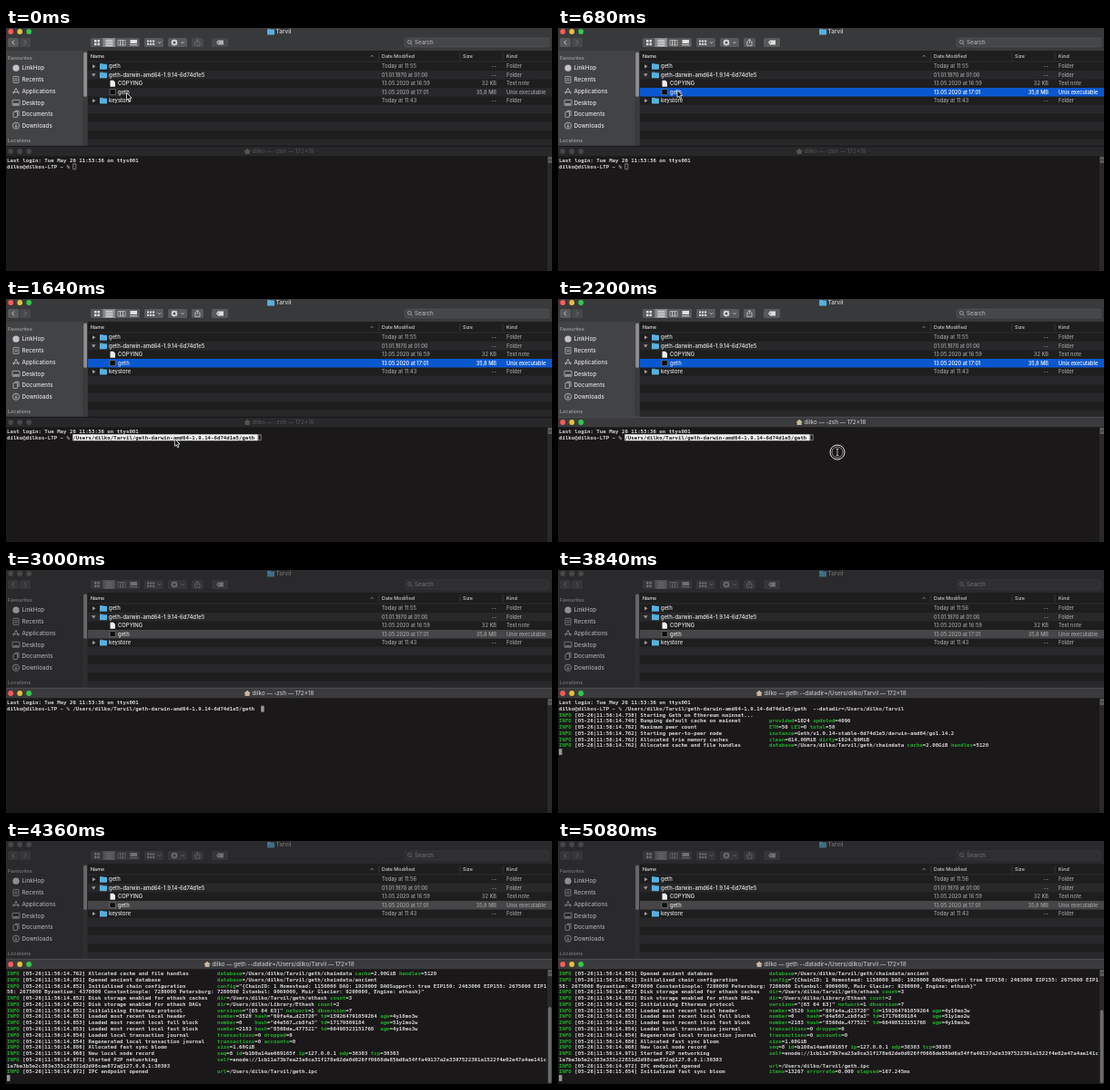
An HTML page with a canvas for the animation above (5.12 s loop, 600 by 268 pixels).

```html
<!DOCTYPE html>
<html lang="en">
<head>
<meta charset="utf-8">
<title>Drag a binary into the terminal</title>
<style>
html, body { margin: 0; width: 100%; height: 100%; overflow: hidden; background: #1b181a; }
canvas { display: block; width: 600px; height: 268px; }
</style>
</head>
<body>
<canvas id="stage" width="600" height="268"></canvas>
<script>
const c = document.getElementById('stage').getContext('2d');
const LOOP = 5120, STEP = 40;
const SANS = 'Inter, sans-serif', MONO = '"DejaVu Sans Mono", monospace';
const GREEN = '#22ad2a', WHITE = '#d8d8d8';

// Timeline, ms
const SELECT = 480, DRAG = 880, DROP = 1480, INSERT = 1640, FOCUS = 2200, BLUR = 2240;
const TYPE = 2880, ENTER = 3640, MODIFIED = 3760;

// ---------- drawing helpers ----------
function box(x, y, w, h, fill, r = 0) {
  c.fillStyle = fill;
  c.beginPath();
  c.roundRect(x, y, w, h, r);
  c.fill();
}
function frame(x, y, w, h, color, r = 0, lw = .7) {
  c.strokeStyle = color;
  c.lineWidth = lw;
  c.beginPath();
  c.roundRect(x, y, w, h, r);
  c.stroke();
}
function dot(x, y, r, fill) {
  c.fillStyle = fill;
  c.beginPath();
  c.arc(x, y, r, 0, 7);
  c.fill();
}
function ring(x, y, r, color, lw) {
  c.strokeStyle = color;
  c.lineWidth = lw;
  c.beginPath();
  c.arc(x, y, r, 0, 7);
  c.stroke();
}
function line(points, color, lw = .8) {
  c.strokeStyle = color;
  c.lineWidth = lw;
  c.beginPath();
  points.forEach(([x, y]) => c.lineTo(x, y));
  c.stroke();
}
function poly(points, fill) {
  c.fillStyle = fill;
  c.beginPath();
  points.forEach(([x, y]) => c.lineTo(x, y));
  c.fill();
}
// Drawn ten times larger and scaled down, so glyph advances stay fractional.
function setFont(size, weight, family) {
  c.font = `${weight} ${size * 10}px ${family}`;
}
function text(s, x, y, size, color, { weight = 500, family = SANS, align = 'left' } = {}) {
  c.save();
  c.translate(x, y + size * .36);
  c.scale(.1, .1);
  setFont(size, weight, family);
  c.textAlign = align;
  c.fillStyle = color;
  c.fillText(s, 0, 0);
  c.restore();
}
function textWidth(s, size) {
  setFont(size, 500, SANS);
  return c.measureText(s).width / 10;
}
// Linear interpolation through [time, value] pairs.
function at(t, keys) {
  if (t <= keys[0][0]) return keys[0][1];
  for (let i = 1; i < keys.length; i++) {
    const [t1, v1] = keys[i], [t0, v0] = keys[i - 1];
    if (t < t1) return v0 + (v1 - v0) * (t - t0) / (t1 - t0);
  }
  return keys[keys.length - 1][1];
}

// ---------- terminal contents ----------
const USER = 'dilko', HOME = '/Users/' + USER, DATA = HOME + '/Tarvil';
const BUILD = 'geth-darwin-amd64-1.9.14-6d74d1e5';
const PROMPT = `${USER}@${USER}s-LTP ~ % `;
const BINARY = `${DATA}/${BUILD}/geth `;
const COMMAND = `${BINARY} --datadir=${DATA} `;
const COLS = 172, ROWS = 18, CW = 3.447, FS = CW / .602, LH = 6.77, TOP = 146;
const NODE = '1cb11e73b7ea23a9ca31f178e62de0d026ff0668de85bd6a54ffa49137a2e3397522391a1522f4e02e47a4ae141c' +
  '1a7be3b5e2c383e353c22831d2d98cae872a';
const CHAIN = '{ChainID: 1 Homestead: 1150000 DAO: 1920000 DAOSupport: true EIP150: 2463000 EIP155: 2675000 ' +
  'EIP158: 2675000 Byzantium: 4370000 Constantinople: 7280000 Petersburg: 7280000 Istanbul: 9069000, ' +
  'Muir Glacier: 9200000, Engine: ethash}';

const LOG = [
  [3680, '14.738', 'Starting Geth on Ethereum mainnet...', ''],
  [3680, '14.740', 'Bumping default cache on mainnet', 'provided=1024 updated=4096'],
  [3760, '14.762', 'Maximum peer count', 'ETH=50 LES=0 total=50'],
  [3760, '14.762', 'Starting peer-to-peer node', 'instance=Geth/v1.9.14-stable-6d74d1e5/darwin-amd64/go1.14.2'],
  [3760, '14.762', 'Allocated trie memory caches', 'clean=614.00MiB dirty=1024.00MiB'],
  [3760, '14.762', 'Allocated cache and file handles', `database=${DATA}/geth/chaindata cache=2.00GiB handles=5120`],
  [4000, '14.851', 'Opened ancient database', `database=${DATA}/geth/chaindata/ancient`],
  [4080, '14.852', 'Initialised chain configuration', `config="${CHAIN}"`],
  [4080, '14.852', 'Disk storage enabled for ethash caches', `dir=${DATA}/geth/ethash count=3`],
  [4080, '14.852', 'Disk storage enabled for ethash DAGs', `dir=${HOME}/Library/Ethash count=2`],
  [4080, '14.852', 'Initialising Ethereum protocol', 'versions="[65 64 63]" network=1 dbversion=7'],
  [4080, '14.853', 'Loaded most recent local header', 'number=3520 hash="69fa4a…d23720" td=159264791059264 age=4y10mo3w'],
  [4080, '14.853', 'Loaded most recent local full block', 'number=0    hash="d4e567…cb8fa3" td=17179869184     age=51y1mo2w'],
  [4080, '14.853', 'Loaded most recent local fast block', 'number=2183 hash="8560de…477521" td=66498523151768  age=4y10mo3w'],
  [4080, '14.854', 'Loaded local transaction journal', 'transactions=0 dropped=0'],
  [4080, '14.854', 'Regenerated local transaction journal', 'transactions=0 accounts=0'],
  [4120, '14.886', 'Allocated fast sync bloom', 'size=1.60GiB'],
  [4280, '14.968', 'New local node record', 'seq=8 id=b160a14ae669165f ip=127.0.0.1 udp=30303 tcp=30303'],
  [4320, '14.971', 'Started P2P networking', `self=enode://${NODE}@127.0.0.1:30303`],
  [4320, '14.972', 'IPC endpoint opened', `url=${DATA}/geth.ipc`],
  [4480, '15.054', 'Initialized fast sync bloom', 'items=13267 errorrate=0.000 elapsed=167.245ms'],
];

// Splits coloured segments into rows of COLS characters.
function wrap(time, segments) {
  const rows = [{ time, parts: [] }];
  let col = 0;
  for (let [s, color] of segments) {
    while (s) {
      if (col === COLS) {
        rows.push({ time, parts: [] });
        col = 0;
      }
      const part = s.slice(0, COLS - col);
      rows[rows.length - 1].parts.push([col, part, color]);
      col += part.length;
      s = s.slice(part.length);
    }
  }
  return rows;
}
const logRows = LOG.flatMap(([time, clock, msg, fields]) => wrap(time, [
  ['INFO', GREEN],
  [` [05-26|11:56:${clock}] ${msg.padEnd(41)}`, WHITE],
  ...fields.split(/(\w+)(?==)/).map((s, i) => [s, i % 2 ? GREEN : WHITE]),
]));
const rows = [
  ...wrap(0, [['Last login: Tue May 26 11:53:36 on ttys001', WHITE]]),
  ...wrap(ENTER, [[PROMPT + COMMAND, WHITE]]),
  ...logRows,
];

function typed(t) {
  if (t < INSERT) return 0;
  if (t < TYPE) return BINARY.length;
  const first = BINARY.length + 1;
  return Math.floor(at(t, [[3040, first], [3400, COMMAND.length]]));
}
const colX = col => 1 + col * CW;
const rowY = row => TOP + row * LH;
function mono(s, col, row, color) {
  text(s, colX(col), rowY(row), FS, color, { weight: 700, family: MONO });
}

// ---------- windows ----------
function lights(y, on) {
  const colors = on ? ['#fc5b57', '#e5bf3c', '#34c84a'] : ['#474749', '#474749', '#474749'];
  colors.forEach((color, i) => dot(5.2 + i * 10, y, 2.9, color));
}
function folder(x, y, w = 8) {
  box(x, y - 3.3, w * .45, 2, '#3f94c6', .5);
  box(x, y - 2.6, w, 6, '#58b0de', .6);
}
function chevron(x, y, color) {
  line([[x - 1.6, y - .8], [x, y + .8], [x + 1.6, y - .8]], color);
}
function execIcon(x, y) {
  box(x - 3, y - 3, 6.4, 6, '#0d0d0d');
  frame(x - 3, y - 3, 6.4, 6, '#8d8d8d', 0, .6);
}

function toolbar(on, picked) {
  const fill = on ? '#58595b' : '#363638', ink = on ? '#dedede' : '#707072';
  box(0, 0, 600, 25, on ? '#38393b' : '#2a2a2c');
  lights(4, on);
  const w = textWidth('Tarvil', 6.4), x = 300 - (w + 9) / 2;
  c.globalAlpha = on ? 1 : .5;
  folder(x, 4);
  c.globalAlpha = 1;
  text('Tarvil', x + 9.5, 4, 6.4, on ? '#d4d4d4' : '#707072');

  box(2, 11, 12, 10, fill, 1.5);
  box(15, 11, 12, 10, on ? '#47484a' : fill, 1.5);
  line([[9, 13.5], [6.8, 16], [9, 18.5]], ink);
  line([[20, 13.5], [22.2, 16], [20, 18.5]], on ? '#858587' : '#5c5c5e');

  box(93, 11, 54, 10, fill, 1.5);
  box(106.5, 11, 13.5, 10, on ? '#87888a' : '#505052');
  for (const gx of [97, 100.5]) for (const gy of [13, 16.6]) box(gx, gy, 2.5, 2.5, ink);
  for (let i = 0; i < 4; i++) box(109.5, 13 + i * 2, 8, .8, on ? '#fff' : ink);
  for (let i = 0; i < 3; i++) frame(123 + i * 2.7, 13.5, 2.7, 5.5, ink, 0, .6);
  box(136.5, 13, 7.5, 4, ink);
  box(136, 18.2, 8.5, 1, ink);

  box(152, 11, 21, 10, fill, 1.5);
  for (let i = 0; i < 3; i++) for (const gy of [13.5, 16.8]) box(155 + i * 3, gy, 2.2, 2, ink);
  chevron(168.5, 16, ink);
  box(178, 11, 21, 10, fill, 1.5);
  ring(185, 16, 2.3, ink, 1.5);
  for (let i = 0; i < 8; i++) {
    const a = i * Math.PI / 4;
    dot(185 + 3.3 * Math.cos(a), 16 + 3.3 * Math.sin(a), .55, ink);
  }
  chevron(194, 16, ink);

  // Share and tag wake up once a file is selected.
  const idle = on && !picked;
  const ink2 = idle ? '#78787a' : ink, fill2 = idle ? '#47484a' : fill;
  box(204, 11, 13, 10, fill2, 1.5);
  line([[209, 15], [207.8, 15], [207.8, 19.3], [213, 19.3], [213, 15], [211.8, 15]], ink2, .7);
  line([[210.4, 17], [210.4, 12.7]], ink2, .7);
  line([[209, 14], [210.4, 12.5], [211.8, 14]], ink2, .7);
  box(226, 11, 18, 10, fill2, 1.5);
  poly([[231, 16], [233, 13.5], [239, 13.5], [239, 18.5], [233, 18.5]], idle ? '#b0b0b2' : ink);
  dot(233.2, 16, .7, fill2);

  box(438, 11, 159, 10, on ? '#454648' : '#2f2f31', 1.8);
  frame(438, 11, 159, 10, on ? '#5a5b5d' : '#3c3c3e', 1.8, .5);
  const find = on ? '#b0b0b2' : '#6c6c6e';
  ring(443.4, 15.4, 1.9, find, .8);
  line([[444.7, 16.8], [446.4, 18.5]], find);
  text('Search', 449, 16, 6.2, find);
}

const PLACES = ['LinkHop', 'Recents', 'Applications', 'Desktop', 'Documents', 'Downloads'];
const ICONS = [
  (x, y, k) => dot(x, y, 3.6, k),
  (x, y, k) => {
    frame(x - 3, y - 3.5, 6, 7, k, .5);
    line([[x - 1.5, y - 1], [x + 1.5, y - 1]], k);
    line([[x - 1.5, y + 1], [x + 1.5, y + 1]], k);
  },
  (x, y, k) => {
    line([[x - 3, y + 3], [x, y - 3.3], [x + 3, y + 3]], k);
    line([[x - 4, y + 1.2], [x + 4, y + 1.2]], k);
  },
  (x, y, k) => {
    frame(x - 4, y - 3, 8, 6, k, .5);
    box(x - 3, y + 1, 6, 1.2, k);
  },
  (x, y, k) => {
    frame(x - 3, y - 2.5, 4.5, 6, k, .4);
    line([[x - 1, y - 3.7], [x + 3, y - 3.7], [x + 3, y + 2]], k);
  },
  (x, y, k) => {
    ring(x, y, 3.6, k, .8);
    line([[x, y - 2], [x, y + 1.8]], k);
    line([[x - 1.5, y + .3], [x, y + 1.8], [x + 1.5, y + .3]], k);
  },
];
function sidebar(on) {
  box(0, 25, 89.5, 105, on ? '#424345' : '#2a2a2c');
  box(84.5, 25, 5, 105, on ? '#3a3b3d' : '#2e2e30');
  box(85.2, 26.5, 3.8, 49.5, on ? '#8e8e90' : '#68686a', 1.9);
  const head = on ? '#a5a5a8' : '#7c7c7e', ink = on ? '#e2e2e4' : '#a8a8aa';
  text('Favourites', 2, 33, 5.4, head);
  PLACES.forEach((name, i) => {
    const y = 44.2 + i * 12.7;
    ICONS[i](11, y, on ? '#c4c4c8' : '#909092');
    text(name, 17.5, y, 6.25, ink);
  });
  text('Locations', 2, 124, 5.4, head);
}

function files(t, on) {
  const rowH = 9.45, top = 37.6, ink = '#e6e6e6', soft = '#a4a4a6';
  box(89.5, 25, 510.5, 106, '#1e1e1f');
  for (let i = 1; i < 10; i += 2) box(90, top + i * rowH, 510, rowH, '#28282a');
  line([[90, 37], [600, 37]], '#3c3c3e', .6);
  for (const x of [410, 499, 546]) line([[x, 27], [x, 35.5]], '#434345', .6);
  text('Name', 93, 31, 5.4, ink);
  line([[400.3, 31.8], [402, 30.2], [403.7, 31.8]], soft, .7);
  text('Date Modified', 413, 31, 5.4, '#cfcfd1');
  text('Size', 502, 31, 5.4, '#cfcfd1');
  text('Kind', 550, 31, 5.4, '#cfcfd1');

  const today = t < MODIFIED ? '11:55' : '11:56';
  const list = [
    ['geth', 'Today at ' + today, '--', 'Folder', 0],
    [BUILD, '01.01.1970 at 01:00', '--', 'Folder', 0],
    ['COPYING', '13.05.2020 at 16:59', '32 KB', 'Text note', 1],
    ['geth', '13.05.2020 at 17:01', '35,8 MB', 'Unix executable', 1],
    ['keystore', 'Today at 11:43', '--', 'Folder', 0],
  ];
  list.forEach(([name, date, size, kind, depth], i) => {
    const y = top + (i + .5) * rowH;
    const picked = i === 3 && t >= SELECT;
    if (picked) box(90, y - rowH / 2, 510, rowH, on ? '#0a58d0' : '#464648');
    const side = picked && on ? '#fff' : soft;
    if (!depth) {
      folder(103, y);
      poly(i === 1 ? [[94, y - 1.5], [98.6, y - 1.5], [96.3, y + 2]]
                   : [[95, y - 2.2], [98.6, y], [95, y + 2.2]], '#9b9b9d');
    } else if (i === 2) {
      poly([[114.5, y - 3.6], [118, y - 3.6], [120, y - 1.6], [120, y + 3.6], [114.5, y + 3.6]], '#f0f0f0');
    } else {
      execIcon(117, y);
    }
    text(name, depth ? 123 : 113, y, 5.9, ink);
    text(date, 413, y, 5.65, side);
    text(size, 539, y, 5.65, side, { align: 'right' });
    text(kind, 550, y, 5.65, side);
  });
}

function scrollbar(total) {
  const top = 150, h = 268 - top;
  box(595, 141.2, 5, 127, '#2a282a');
  box(595.5, 142, 4.5, 7, '#5a5a5c', .6);
  line([[596.5, 145.5], [599.5, 145.5]], '#29292b', .7);
  if (total > ROWS) {
    const thumb = h * ROWS / total;
    box(595.8, 268 - thumb, 3.6, thumb - 1, '#6c6c6e', 1.8);
  }
}

function terminal(t, on) {
  box(0, 130, 600, 138, '#1b181a');
  box(0, 130, 600, 11.2, on ? '#3b3b3d' : '#28282a');
  line([[0, 130.3], [600, 130.3]], on ? '#58585a' : '#0f0f10', .7);
  lights(136, on);
  const job = t < ENTER ? '-zsh' : `geth --datadir=${DATA}`;
  const title = `${USER} — ${job} — 172×18`;
  const x = 300 - (textWidth(title, 6.3) + 9) / 2;
  const roof = on ? '#c9b9a4' : '#58554f';
  poly([[x, 136], [x + 3.7, 132.7], [x + 7.4, 136]], roof);
  box(x + 1.2, 135.7, 5, 3.2, roof);
  text(title, x + 9, 136, 6.3, on ? '#c0c0c2' : '#505052');

  const shown = rows.filter(r => r.time <= t);
  const total = shown.length + 1, scroll = Math.max(0, total - ROWS);
  scrollbar(total);
  shown.slice(scroll).forEach((r, i) => r.parts.forEach(([col, s, color]) => mono(s, col, i, color)));

  const row = shown.length - scroll;
  let col = 0;
  if (t < ENTER) {
    const entered = COMMAND.slice(0, typed(t));
    const marked = t >= INSERT && t < BLUR;
    mono(PROMPT, 0, row, WHITE);
    if (marked) box(colX(PROMPT.length), rowY(row) - 3.4, entered.length * CW, LH, '#f2f2f2');
    mono(entered, PROMPT.length, row, marked ? '#1b181a' : WHITE);
    col = PROMPT.length + entered.length;
  }
  if (t < BLUR) frame(colX(col) + .4, rowY(row) - 3, CW - .4, 6, '#a5a5a7', 0, .7);
  else box(colX(col), rowY(row) - 3, CW, LH, '#98989a');
}

// ---------- pointer ----------
const PATH_X = [[0, 132.5], [640, 131], [DRAG, 131], [1120, 157], [1200, 167.5], [DROP, 176], [1720, 190], [2160, 307]];
const PATH_Y = [[0, 71.5], [640, 68.5], [DRAG, 69], [1120, 127], [1200, 148.5], [DROP, 153], [1720, 155], [2160, 169]];
const RING = [[680, 0], [840, 19], [DROP, 19], [INSERT, 0], [2120, 0], [FOCUS, 8], [2320, 0]];

function arrow(x, y) {
  c.beginPath();
  [[0, 0], [0, 8], [1.9, 6.4], [3.2, 9.4], [4.6, 8.8], [3.3, 5.9], [5.7, 5.7]]
    .forEach(([dx, dy]) => c.lineTo(x + dx, y + dy));
  c.closePath();
  c.fillStyle = '#0a0a0a';
  c.fill();
  c.strokeStyle = '#f4f4f4';
  c.lineWidth = .8;
  c.stroke();
}
function ibeam(x, y) {
  const k = '#e0e0e0';
  line([[x, y - 3.6], [x, y + 3.6]], k);
  for (const s of [-1, 1]) line([[x - 1.6, y + s * 4], [x, y + s * 3.3], [x + 1.6, y + s * 4]], k, .7);
}
function pointer(t) {
  if (t >= TYPE) return;
  const x = at(t, PATH_X), y = at(t, PATH_Y), r = at(t, RING);
  const dragging = t >= DRAG && t < DROP;
  if (r > 1) {
    dot(x, y, r, 'rgba(20,18,20,.35)');
    ring(x, y, r, '#e4e4e4', 1);
    if (r > 4) ring(x, y, r - 2, '#a8a8aa', .8);
  }
  if (dragging) {
    c.globalAlpha = .85;
    execIcon(x - 14, y - 2);
    box(x - 10.5, y - 6, 17, 8, '#0a58d0', 3.5);
    c.globalAlpha = 1;
    text('geth', x - 8.5, y - 2, 5.9, '#d6e2f6');
  }
  if (t >= 1720) ibeam(x, y);
  else arrow(x, y);
  if (dragging && y > 131) {
    const px = x + 4.8, py = y + 9.6;
    dot(px, py, 4.2, '#2fb344');
    line([[px - 2.3, py], [px + 2.3, py]], '#fff', 1.2);
    line([[px, py - 2.3], [px, py + 2.3]], '#fff', 1.2);
  }
}

function draw(t) {
  const finderOn = t < BLUR;
  files(t, finderOn);
  sidebar(finderOn);
  toolbar(finderOn, t >= SELECT);
  terminal(t, t >= FOCUS);
  pointer(t);
}

const start = performance.now();
function tick() {
  const t = (performance.now() - start) % LOOP;
  draw(Math.floor(t / STEP) * STEP);
  requestAnimationFrame(tick);
}
tick();
</script>
</body>
</html>
```
